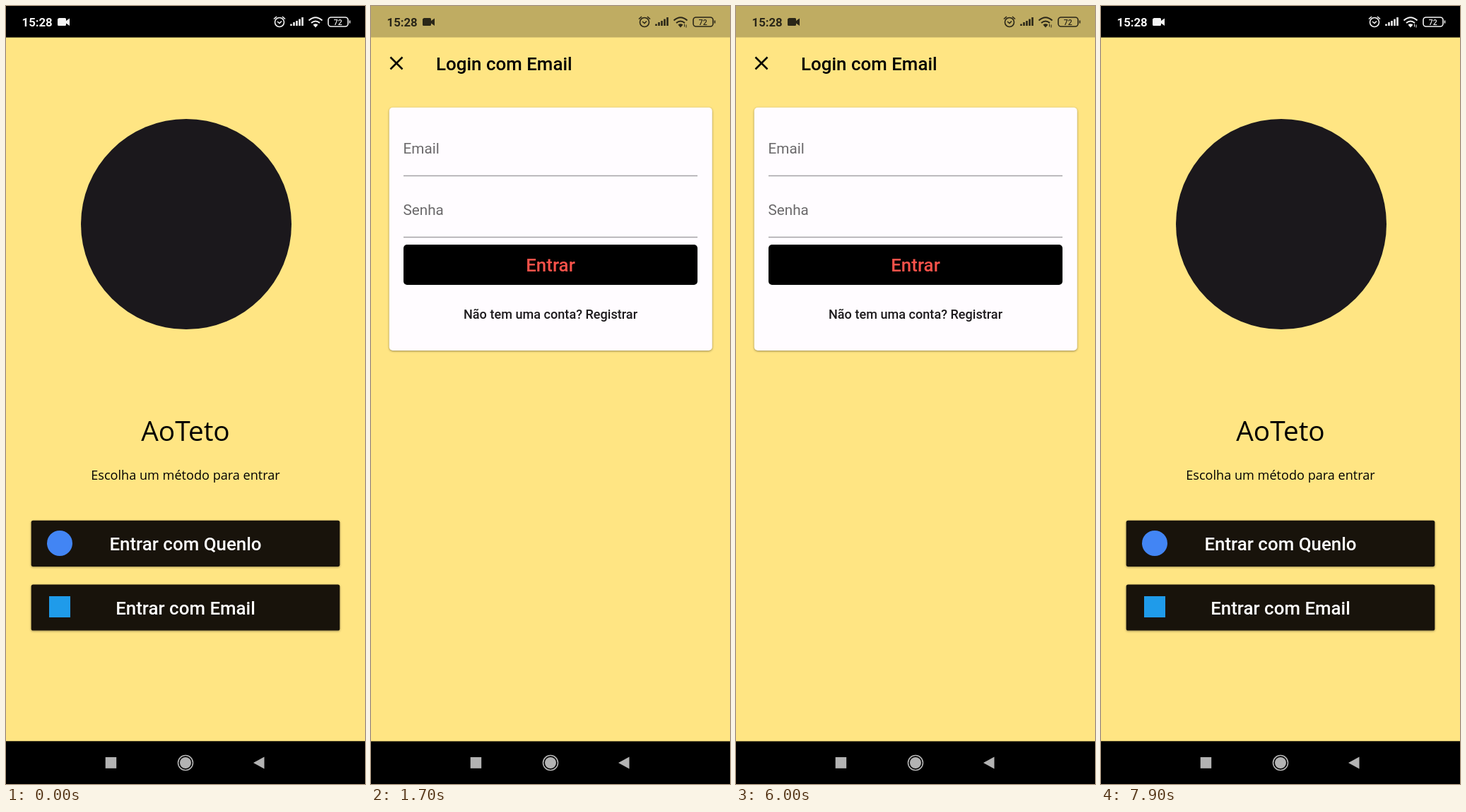
Recreate the animation shown at these times as an HTML page. Size 508 by 1102 pixels, loop 8000 ms.

```html
<!DOCTYPE html>
<html lang="pt">
<head>
<meta charset="utf-8">
<style>
  html, body { margin: 0; width: 100%; height: 100%; overflow: hidden; background: #000; }
  svg { display: block; width: 100%; height: 100%; }
  text { font: 500 25.9px Roboto, sans-serif; }
  .mid { text-anchor: middle; }
  .open { font-family: "Open Sans", sans-serif; font-weight: 400; }
  .label { font-size: 20.7px; font-weight: 400; fill: #6b696b; }
  .small { font-size: 18.1px; }
  .line { fill: none; stroke: currentColor; stroke-width: 1.6; }
  .shadow { filter: drop-shadow(0 1.5px 1.5px rgba(0, 0, 0, .4)); }
</style>
</head>
<body>
<svg viewBox="0 0 508 1102">
  <clipPath id="view"><rect width="508" height="1041.3"/></clipPath>
  <rect width="508" height="1102"/>

  <g id="home">
    <rect y="44.5" width="508" height="996.8" fill="#ffe583"/>
    <circle cx="255" cy="309" r="149" fill="#1b181c"/>
    <text class="mid open" x="254" y="616" style="font-size:38.8px">AoTeto</text>
    <text class="mid open small" x="254" y="671">Escolha um método para entrar</text>
    <g class="shadow" fill="#18130b">
      <rect x="35.7" y="728.7" width="436.6" height="65.2" rx="2.6"/>
      <rect x="35.7" y="819.5" width="436.6" height="65" rx="2.6"/>
    </g>
    <circle cx="76" cy="761" r="18" fill="#4285f4"/>
    <rect x="61" y="836" width="30" height="30" fill="#1f9bea"/>
    <g class="mid" fill="#fff">
      <text x="254" y="771">Entrar com Quenlo</text>
      <text x="254" y="861.7">Entrar com Email</text>
    </g>
  </g>

  <g clip-path="url(#view)">
    <g id="login">
      <rect width="508" height="1042" fill="#ffe583"/>
      <circle id="ripple" cx="36" cy="81" fill="#000" opacity=".07"/>
      <path d="M27.5 72.5l17 17m0-17l-17 17" stroke="#000" stroke-width="2.5"/>
      <text x="92" y="91">Login com Email</text>
      <rect class="shadow" x="25.8" y="143.7" width="457" height="344.3" rx="5" fill="#fffcff"/>
      <text class="label" x="45.5" y="209">Email</text>
      <text class="label" x="45.5" y="296">Senha</text>
      <path d="M46 240.5h416M46 327.5h416" stroke="#a5a3a6" stroke-width="1.4"/>
      <rect x="46" y="338" width="416" height="57" rx="5"/>
      <text id="action" class="mid" x="254" y="376" fill="#f9524a"></text>
      <text id="link" class="mid small" x="254" y="442.5" fill="#1c1a1c"></text>
    </g>
  </g>

  <rect width="508" height="44.5" opacity=".25"/>
  <g id="status" fill="currentColor">
    <text x="22.5" y="28.5" style="font-size:16.8px;font-weight:700">15:28</text>
    <path d="M74.5 17h9q1.5 0 1.5 1.5v2.5l5-3.5v10.5l-5-3.5v2q0 1.5-1.5 1.5h-9q-1.5 0-1.5-1.5v-7.5q0-1.5 1.5-1.5z"/>
    <g class="line">
      <circle cx="387" cy="23" r="6.5"/>
      <path d="M379 18.5l4-3.5m12 3.5l-4-3.5M384 22l3 2.5l3-3"/>
      <rect x="456" y="16" width="28" height="13" rx="4"/>
      <path d="M486.5 20.5v4"/>
    </g>
    <path d="M403.5 28v-2.500m4 2.500v-5m4 5v-7m4 7v-9.500m4 9.500v-12" class="line" style="stroke-width:2.6"/>
    <path d="M428.500 20.500q9.500-8.500 19 0M432 24q6-5 12 0" class="line" style="stroke-width:2"/>
    <path d="M434.500 26.500q3.500-2.500 7 0l-3.500 4z"/>
    <path id="traffic" d="M443.500 25.500v4m2.500-3v4" class="line" style="stroke-width:1"/>
    <text class="mid" x="469.700" y="26.500" style="font-size:10.5px">72</text>
  </g>

  <g fill="#b3b3b3">
    <rect x="140.700" y="1064" width="15.500" height="15.800"/>
    <circle cx="254" cy="1072" r="8"/>
    <circle cx="254" cy="1072" r="10.500" fill="none" stroke="#b3b3b3" stroke-width="1.600"/>
    <path d="M350 1072l15.500-8.500v17z"/>
  </g>
</svg>
<script>
const LOOP = 8000, OPEN = 1000, CLOSE = 6917, DURATION = 300;
const $ = id => document.getElementById(id);
const clamp = x => Math.min(1, Math.max(0, x));

// Cubic Bézier easing whose vertical handles are 0 and 1.
const ease = (x1, x2) => x => {
  const at = (a, b, s) => 3 * (1 - s) ** 2 * s * a + 3 * (1 - s) * s * s * b + s ** 3;
  let lo = 0, hi = 1;
  for (let i = 0; i < 24; i++) {
    const s = (lo + hi) / 2;
    if (at(x1, x2, s) < x) lo = s; else hi = s;
  }
  return at(0, 1, lo);
};
const slide = ease(.4, .2), fade = ease(.42, 1);

function render(t) {
  const p = clamp((t - OPEN) / DURATION) - clamp((t - CLOSE) / DURATION);
  $('login').setAttribute('transform', `translate(0 ${260 * (1 - slide(p))})`);
  $('login').setAttribute('opacity', p > 0 ? fade(p) : 0);
  $('ripple').setAttribute('r', 43 * clamp((t - 6800) / 150));

  const register = t >= 3500 && t < 5100;
  $('action').textContent = register ? 'Criar uma conta' : 'Entrar';
  $('link').textContent = register ? 'Já possui uma conta? Entrar' : 'Não tem uma conta? Registrar';

  $('status').style.color = t >= 1300 && t < 7050 ? '#2a2618' : '#f4f4f4';
  $('traffic').style.opacity = t >= OPEN ? 1 : 0;
}

function tick() {
  render(performance.now() % LOOP);
  requestAnimationFrame(tick);
}
tick();
</script>
</body>
</html>
```
